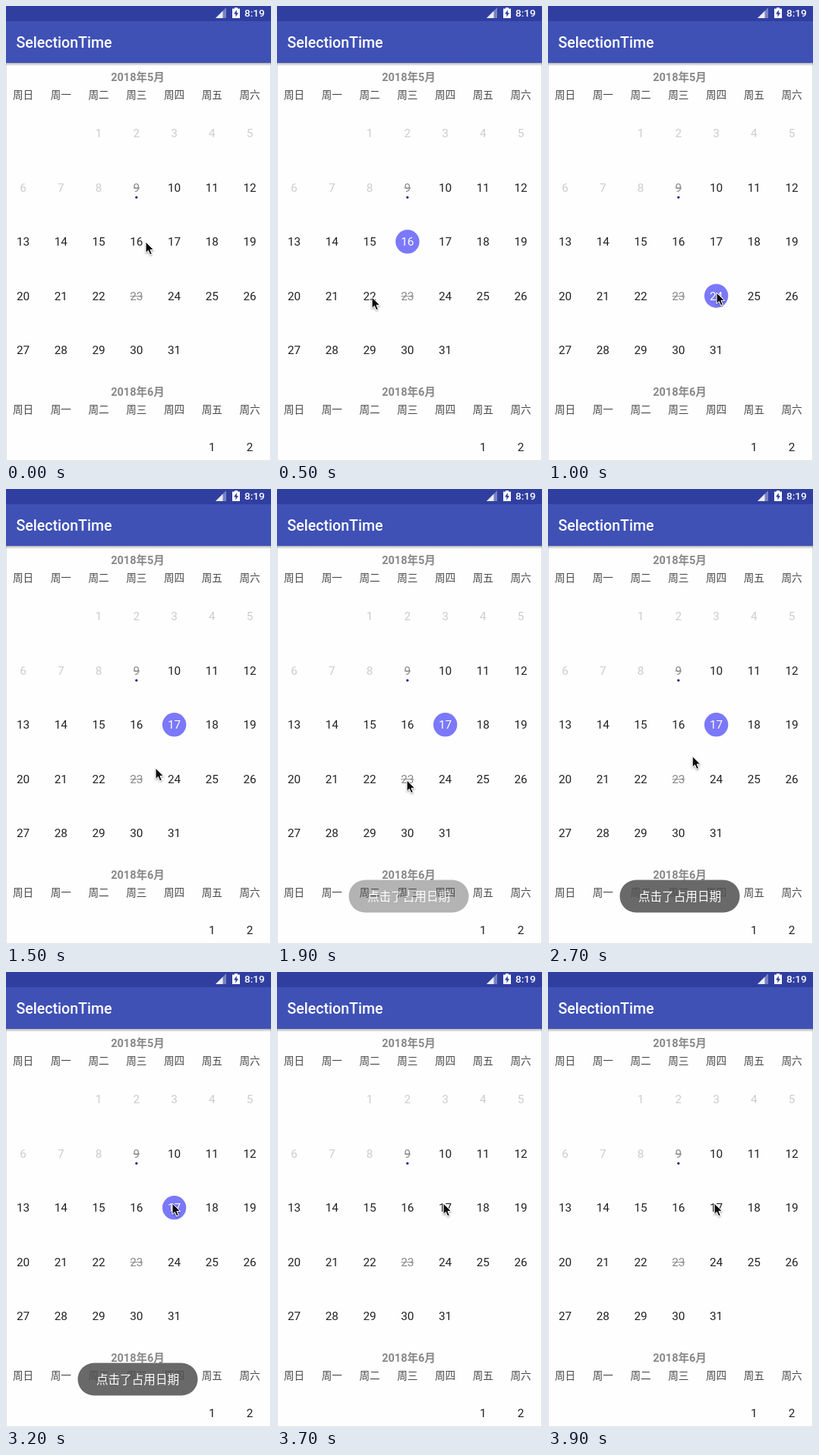
An HTML page that plays this animation: 349 by 600 pixels, repeating every 4 s.

```html
<!DOCTYPE html>
<html lang="zh-CN">
<head>
<meta charset="utf-8">
<title>Calendar</title>
<style>
  html, body { margin: 0; width: 100%; height: 100%; overflow: hidden; background: #fefefe; }
  svg { display: block; width: 349px; height: 600px; }
  text { font-family: Roboto, "Noto Sans CJK SC", "Noto Sans CJK", sans-serif; }
  .mid { text-anchor: middle; }
  .month { font-size: 14.5px; font-weight: 700; fill: #888; }
  .week { font-size: 13.6px; fill: #484848; }
  .day { font-size: 15.3px; fill: #222; }
  .past { fill: #ccc; }
  .busy { fill: #888; }
  .on { fill: #fff; }
</style>
</head>
<body>
<svg viewBox="0 0 349 600">
  <defs>
    <linearGradient id="shade" x2="0" y2="1">
      <stop stop-color="#000" stop-opacity=".3"/>
      <stop offset="1" stop-color="#000" stop-opacity="0"/>
    </linearGradient>
    <filter id="soft" x="-50%" y="-50%" width="200%" height="200%">
      <feDropShadow dx="0" dy="1.2" stdDeviation="1.2" flood-opacity=".4"/>
    </filter>
  </defs>

  <path d="M.5 75V599.5H348.5V75" fill="none" stroke="#e2e2e2"/>
  <circle id="mark" r="15.7" fill="#7b78fa"/>
  <g id="calendar"></g>
  <circle cx="171.8" cy="252.3" r="1.6" fill="#1c1a85"/>

  <rect y="75" width="349" height="4" fill="url(#shade)"/>
  <rect width="349" height="75" fill="#3f51b5"/>
  <rect width="349" height="20" fill="#303f9f"/>
  <path d="M276 16L290 2V16Z" fill="#fff" fill-opacity=".35"/>
  <path d="M276 16L285.5 6.5V16Z" fill="#fff" fill-opacity=".85"/>
  <path d="M298 3.5H301V2H305V3.5H308V16H298Z" fill="#fff"/>
  <path d="M303.8 5L300 10.4H302.4V14.4L306 9H303.8Z" fill="#303f9f"/>
  <text x="314" y="14.2" font-size="13.6" font-weight="500" fill="#fff">8:19</text>
  <text x="13.4" y="54.8" font-size="19.6" font-weight="500" fill="#fff">SelectionTime</text>

  <g id="toast">
    <rect x="94.5" y="515.5" width="158" height="43" rx="21.5" fill="#515151" fill-opacity=".86"/>
    <text class="mid" x="173.5" y="543" font-size="15.6" fill="#fff">点击了占用日期</text>
  </g>

  <path id="cursor" filter="url(#soft)" stroke="#fff" stroke-width="1" stroke-linejoin="round" fill="#111"
    d="M0 0V14.6L3.3 11.5L5.7 17L8.3 15.9L6 10.5H10.6Z"/>
</svg>
<script>
const $ = id => document.getElementById(id);
const calendar = $('calendar');
const colX = col => 22.6 + col * 49.75;
const rowY = row => 168 + row * 71.4;
const cell = day => ({ x: colX((day + 1) % 7), y: rowY(Math.floor((day + 1) / 7)) });

function add(name, attrs, content = '') {
  const el = document.createElementNS('http://www.w3.org/2000/svg', name);
  for (const key in attrs) el.setAttribute(key, attrs[key]);
  el.textContent = content;
  return calendar.appendChild(el);
}
const label = (x, y, kind, content) => add('text', { x, y, class: 'mid ' + kind }, content);

function heading(month, top) {
  label(173.5, top + 5.3, 'month', `2018年${month}月`);
  [...'日一二三四五六'].forEach((d, i) => label(colX(i), top + 27.8, 'week', '周' + d));
}

heading(5, 94);
heading(6, 509);
const days = [];
for (let d = 1; d <= 31; d++) {
  const { x, y } = cell(d);
  const busy = d === 9 || d === 23;
  days[d] = label(x, y + 5.4, 'day ' + (busy ? 'busy' : d < 9 ? 'past' : ''), d);
  if (busy) {
    const half = d > 9 ? 8.5 : 4.3;
    add('path', { d: `M${x - half} ${y + .6}h${half * 2}`, stroke: '#888' });
  }
}
label(colX(5), 586.9, 'day', 1);
label(colX(6), 586.9, 'day', 2);

// [time, value...] keys; times in ms
const picks = [[0, 0], [200, 16], [600, 22], [900, 24], [1300, 17], [3400, 0]];
const path = [
  [0, 184, 311], [200, 184, 311], [500, 125, 384], [600, 125, 384], [900, 222, 378],
  [1000, 222, 378], [1300, 219, 310], [1400, 214, 322], [1500, 197, 368],
  [1800, 171, 384], [2500, 171, 384], [3000, 219, 305], [4000, 219, 305]
];
const fade = [[0, 0], [1800, 0], [2000, 1], [3500, 1], [3700, 0], [4000, 0]];

function at(keys, t) {
  const i = keys.findIndex(k => k[0] > t);
  const a = keys[i - 1], b = keys[i];
  const p = (t - a[0]) / (b[0] - a[0]);
  return a.slice(1).map((v, n) => v + (b[n + 1] - v) * p);
}

function draw() {
  const t = Math.floor(performance.now() % 4000 / 100) * 100;
  const day = picks.filter(k => k[0] <= t).pop()[1];
  const { x, y } = cell(day);
  $('mark').setAttribute('cx', x);
  $('mark').setAttribute('cy', y);
  $('mark').style.display = day ? '' : 'none';
  days.forEach((el, d) => el.classList.toggle('on', d === day));
  $('cursor').setAttribute('transform', `translate(${at(path, t)})`);
  $('toast').setAttribute('opacity', at(fade, t)[0]);
  requestAnimationFrame(draw);
}
draw();
</script>
</body>
</html>
```
